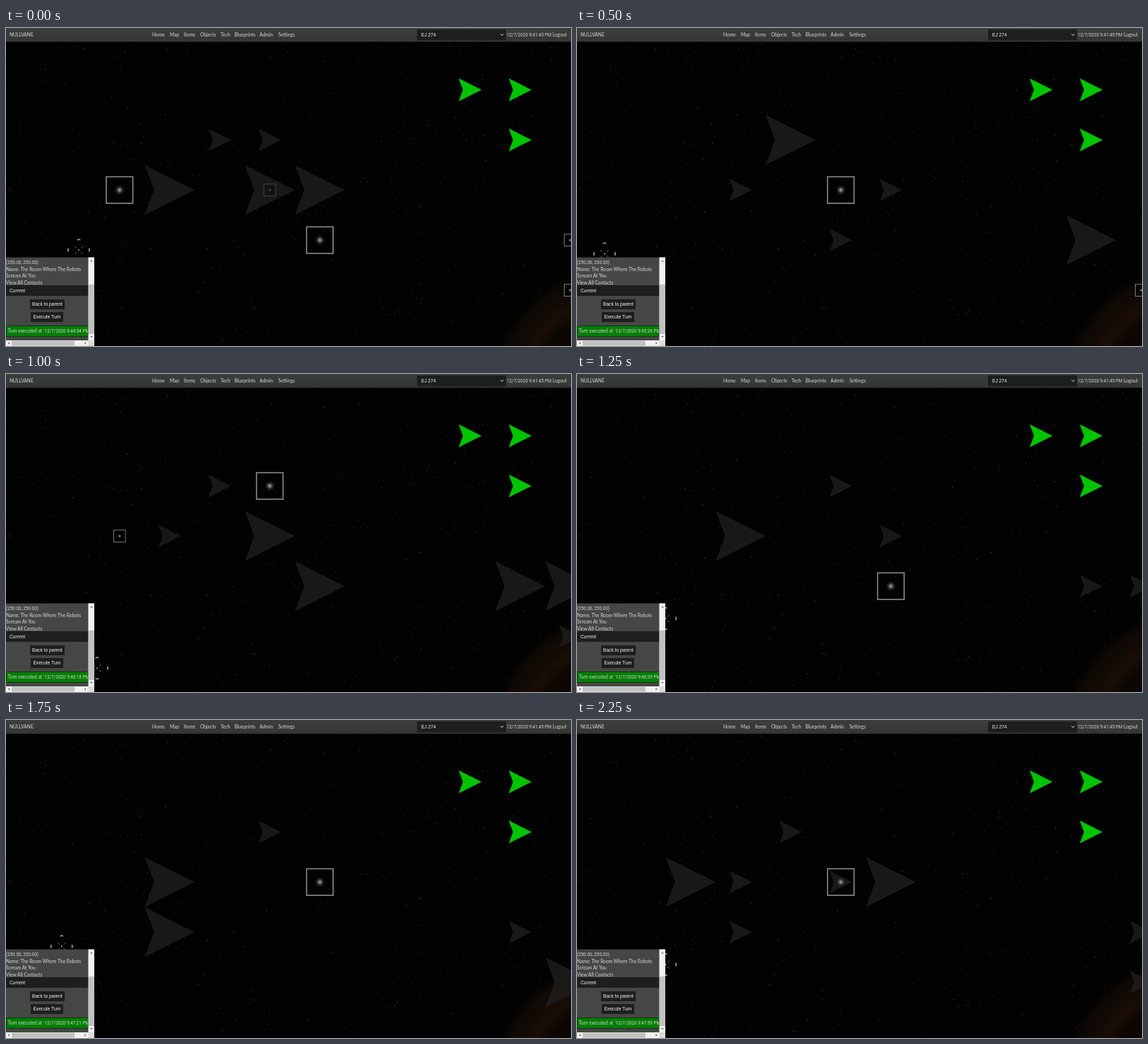
Animation, 800 px wide and 450 px high, one loop 2500 ms. Source, as an HTML page:

```html
<!DOCTYPE html>
<html lang="en">
<head>
<meta charset="utf-8">
<title>Space map</title>
<style>
html, body { margin: 0; width: 100%; height: 100%; overflow: hidden; background: #000; }
svg { display: block; width: 800px; height: 450px; }
text { font: 6.65px Lato, "Open Sans", sans-serif; fill: #d6d6d6; white-space: pre; }
.ui { font-family: "Liberation Sans", Arial, sans-serif; fill: #f4f4f4; }
.date { font: 6.3px Roboto, sans-serif; }
.turn { visibility: hidden; animation: show 2.5s step-end infinite; }
@keyframes show {
  0% { visibility: visible; }
  10%, 100% { visibility: hidden; }
}
</style>
</head>
<body>
<svg viewBox="0 0 800 450" xmlns="http://www.w3.org/2000/svg">
  <defs>
    <radialGradient id="planet">
      <stop offset=".5" stop-color="#090502"/>
      <stop offset=".66" stop-color="#0d0703"/>
      <stop offset=".76" stop-color="#1a0e06"/>
      <stop offset=".84" stop-color="#130a05"/>
      <stop offset=".93" stop-color="#0d0804"/>
      <stop offset="1" stop-color="#070402" stop-opacity="0"/>
    </radialGradient>
    <radialGradient id="glow">
      <stop offset="0" stop-color="#b4aca9"/>
      <stop offset=".25" stop-color="#6f6664"/>
      <stop offset=".55" stop-color="#332c2b" stop-opacity=".7"/>
      <stop offset="1" stop-color="#181313" stop-opacity="0"/>
    </radialGradient>
    <linearGradient id="bar" x2="0" y2="1">
      <stop offset="0" stop-color="#3c3e3c"/>
      <stop offset="1" stop-color="#343634"/>
    </linearGradient>
    <clipPath id="pane"><rect y="325" width="116.5" height="117"/></clipPath>
    <path id="arrow" d="M-1-1 1 0-1 1-.62 0Z"/>
    <g id="smallBox">
      <rect x="-8.4" y="-8.4" width="16.8" height="16.8" fill="#000" fill-opacity=".5" stroke="#787a73"/>
      <circle r="3.4" fill="url(#glow)"/>
    </g>
    <g id="bigBox">
      <rect x="-18.8" y="-18.8" width="37.6" height="37.6" fill="none" stroke="#8a8c87" stroke-width="1.6"/>
      <circle r="8" fill="url(#glow)"/>
    </g>
    <path id="tick" d="M-1.8-13.6V-15.4H1.8V-13.6M0-15.4V-14" fill="none" stroke="#bdbdbd" stroke-width=".9"/>
    <g id="reticle">
      <use href="#tick"/>
      <use href="#tick" transform="rotate(90)"/>
      <use href="#tick" transform="rotate(180)"/>
      <use href="#tick" transform="rotate(270)"/>
      <path d="M-6-5.5-2.7-2.5M6-5.5 2.7-2.5M-6 5.5-2.7 2.5M6 5.5 2.7 2.5" stroke="#777" stroke-width=".8"/>
      <circle r=".9" fill="#ddd"/>
    </g>
  </defs>

  <rect width="800" height="450" fill="#010201"/>
  <g id="stars"></g>
  <circle cx="872" cy="520" r="188" fill="url(#planet)"/>
  <g id="ships" fill="#00c400"></g>
  <g id="map"></g>

  <rect width="800" height="19.5" fill="url(#bar)"/>
  <text x="5" y="12.3">NULLVANE</text>
  <g id="nav"></g>
  <rect x="582" y="2" width="126" height="15.4" fill="#1d1f1d"/>
  <text class="ui" x="588" y="12">EJ 274</text>
  <path d="M700.3 8.5 702.3 10.6 704.3 8.5" fill="none" stroke="#eee"/>
  <text class="date" x="709" y="12.3">12/7/2020 9:41:45 PM</text>
  <text x="774" y="12.3">Logout</text>

  <rect y="324.6" width="125" height="125.4" fill="#454745"/>
  <text class="date" x="0" y="333.7">(250.00, 250.00)</text>
  <text x="0" y="343.6">Name: The Room Where The Robots</text>
  <text x="0" y="353.2">Scream At You</text>
  <text x="0" y="362.5">View All Contacts</text>
  <rect y="364" width="117" height="15" fill="#1d1f1d"/>
  <text class="ui" x="5" y="374">Current</text>
  <rect x="34" y="384" width="49" height="14" fill="#1d1f1d"/>
  <text class="ui" x="37" y="393.3">Back to parent</text>
  <rect x="35" y="402" width="46" height="14" fill="#1d1f1d"/>
  <text class="ui" x="38.4" y="411.3">Execute Turn</text>
  <rect x=".4" y="421.4" width="116" height="15.2" fill="#047e04" stroke="#0b2a0b" stroke-width=".8"/>
  <g id="log" clip-path="url(#pane)"></g>

  <path d="M116.5 324.6H125V450H0V442H116.5Z" fill="#f1f1f1"/>
  <path d="M116.5 442H125V450H116.5Z" fill="#dcdcdc"/>
  <path d="M117 363H125V433H117ZM8 442.5H97V449.5H8Z" fill="#c1c1c1"/>
  <path d="M119.3 330.5H122.7L121 328.5ZM119.3 436H122.7L121 438ZM5 444.3V447.7L3 446ZM111.5 444.3V447.7L113.5 446Z" fill="#555"/>
</svg>
<script>
const get = id => document.getElementById(id);
const col = c => 160.8 + 70.9 * c;
const row = r => 87.5 + 70.9 * r;

// Items: a/A arrow, b/B contact box, d faint box; then column and row.
const turns = [
  { at: [103, 314.3], time: "9:44:34", items: "a21 a31 A12 A32 A42 d32 B02 B43 b93 b94" },
  { at: [52.4, 319.3], time: "9:44:58", items: "a21 a43 a83 a93 A94 b31 b32 b42 b13" },
  { at: [39, 319.5], time: "9:45:26", items: "A21 a12 a42 B32 a33 A83 b94" },
  { at: [129, 416.3], time: "9:45:54", items: "A12 a42 a83 A93 A94 B32" },
  { at: [129, 416.3], time: "9:46:18", items: "a21 a12 A32 A43 A83 A93 a94 B31 b02" },
  { at: [125.3, 346], time: "9:46:39", items: "a31 A12 a42 B43 a83 a93" },
  { at: [78.8, 320.3], time: "9:47:00", items: "a02 A32 a32 a42 a43 A83 b21 B31 B13" },
  { at: [78.8, 320.3], time: "9:47:21", items: "a31 A12 A13 a83 A94 B42" },
  { at: [125.3, 346], time: "9:47:40", items: "a12 A32 a43 A93 B21 b42" },
  { at: [125.3, 346], time: "9:47:59", items: "a21 A02 a12 a13 a32 A42 a93 a94 B32" }
];

function arrow(c, r, size, attrs = "") {
  return `<use href="#arrow" transform="translate(${col(c)} ${row(r)}) scale(${size})" ${attrs}/>`;
}

function item([kind, c, r]) {
  if (kind === "a" || kind === "A")
    return arrow(c, r, kind === "A" ? 35.4 : 16, 'fill="#1e1e1e" opacity=".82"');
  const id = kind === "B" ? "bigBox" : "smallBox";
  return `<use href="#${id}" x="${col(c)}" y="${row(r)}" opacity="${kind === "d" ? .45 : 1}"/>`;
}

const phased = draw => turns.map((turn, i) =>
  `<g class="turn" style="animation-delay:${(i - turns.length) * 250}ms">${draw(turn)}</g>`).join("");

get("map").innerHTML = phased(({ at: [x, y], items }) =>
  items.split(" ").map(item).join("") + `<use href="#reticle" x="${x}" y="${y}"/>`);

get("log").innerHTML = phased(({ time }) =>
  `<text x="2.5" y="431.4">Turn executed at</text><text class="date" x="53.5" y="431.4">'12/7/2020 ${time} PM</text>`);

get("ships").innerHTML = arrow(7, 0, 16.2) + arrow(8, 0, 16.2) + arrow(8, 1, 16.2);

const links = { Home: 207, Map: 232, Items: 252, Objects: 275, Tech: 304, Blueprints: 323.5, Admin: 359, Settings: 385.5 };
get("nav").innerHTML = Object.entries(links).map(([name, x]) => `<text x="${x}" y="12.3">${name}</text>`).join("");

let seed = 77;
const random = () => (seed = seed * 16807 % 2147483647) / 2147483647;
function stars(count, color, size) {
  let d = "";
  for (let i = 0; i < count; i++)
    d += `M${(random() * 800).toFixed(1)} ${(20 + random() * 430).toFixed(1)}h${size}v${size}h-${size}z`;
  return `<path d="${d}" fill="${color}"/>`;
}
get("stars").innerHTML = stars(550, "#1c1d18", 1.1) + stars(240, "#302a20", 1.2) +
  stars(170, "#223122", 1.2) + stars(60, "#46433a", 1.2);
</script>
</body>
</html>
```
